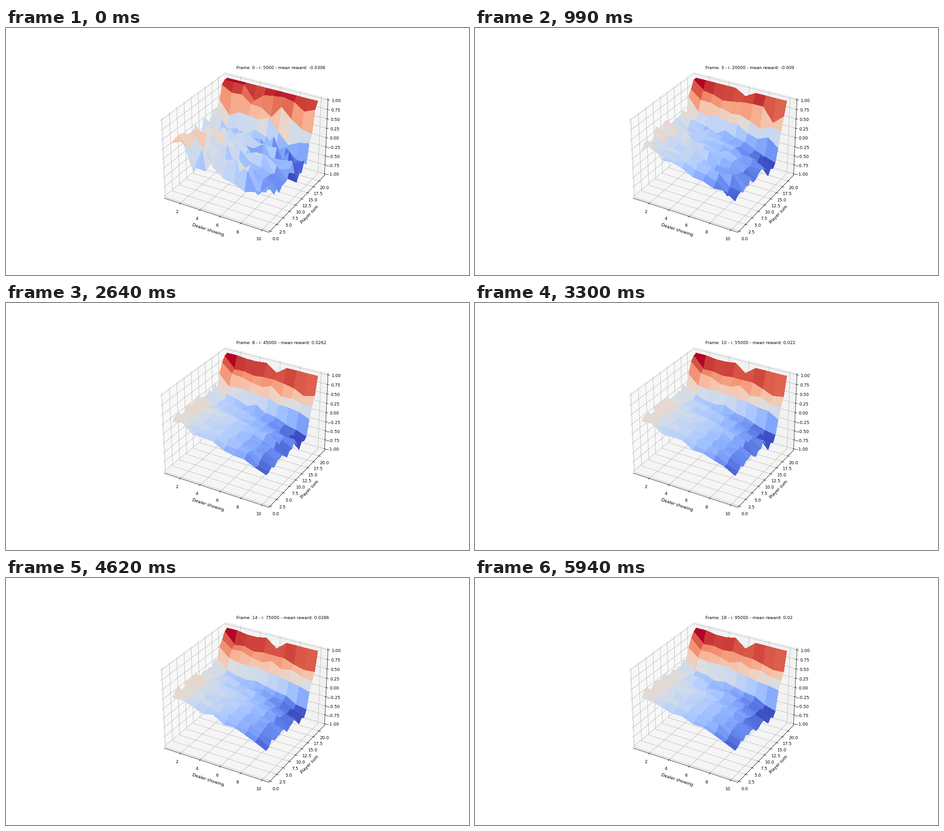
Write a matplotlib script that moves like this. It is 1025 px wide and 547 px high and loops after 6.27 s.

```python
import numpy as np
import matplotlib.pyplot as plt
from matplotlib.animation import FuncAnimation

WIDTH, HEIGHT, DPI = 1025, 547, 68.35
FRAMES, INTERVAL = 19, 330
EPISODES = 5000

rng = np.random.default_rng(21)
dealer, player = np.meshgrid(np.arange(1, 11), np.arange(1, 22))
across = (dealer - 1) / 9
depth = (player - 1) / 15

# How close each player sum is to a sure win
strength = np.interp(player, [16, 17, 18, 19, 20, 21], [0, .08, .42, .57, .70, 1])


def dip(center, width):
    return np.exp(-((dealer - center) / width) ** 2)


def settled_values():
    """Value surface that the estimates approach."""
    low = (.28 - .45 * across - .15 * depth ** 2
           + .05 * np.sin(np.pi * np.minimum(depth, 1)) - .14 * across ** 8)
    ace_bonus = np.where(dealer == 1, .05 + .12 * depth ** 2, 0)
    back_row = np.where(player == 21, .1 * dip(3.5, .8) + .24 * dip(6, .6), 0)
    return low + (1 - low) * strength + ace_bonus - back_row


def running_mean_noise():
    """Monte Carlo error that shrinks as batches are averaged."""
    spread = .2 * (1 - strength ** 4)
    batches = rng.normal(0, 1, (FRAMES, *dealer.shape)) * spread
    return np.cumsum(batches, axis=0) / np.arange(1, FRAMES + 1)[:, None, None]


settled = settled_values()
noise = running_mean_noise()


def values(n):
    early_luck = .35 * strength / (n + 1)
    unlearned = .25 * np.exp(-n / 6) * np.exp(-(player - 18) ** 2)
    return np.clip(settled + noise[n] + early_luck - unlearned, -1, 1)


def mean_reward(n):
    reward = np.interp(n, [0, 3, 5, 8, 10, 14, 18],
                       [-.0306, -.009, .028, .0262, .022, .0286, .02])
    return f"{round(float(reward), 4):g}"


def padded(low, high):
    pad = (high - low) / 48
    return low - pad, high + pad


fig = plt.figure(figsize=(WIDTH / DPI, HEIGHT / DPI), dpi=DPI, facecolor="white")
fig.subplots_adjust(left=.125, right=.9, bottom=.125, top=.88)
ax = fig.add_subplot(projection="3d")
ax.view_init(elev=30, azim=-60)
ax.set_xlim(*padded(.55, 10.45))
ax.set_ylim(*padded(0, 22))
ax.set_zlim(*padded(-1, 1))
ax.set_xticks(np.arange(2, 11, 2))
ax.set_yticks(np.arange(0, 20.1, 2.5))
ax.set_zticks(np.arange(-1, 1.1, .25))
ax.set_xlabel("Dealer showing")
ax.set_ylabel("Player sum")
title = fig.text(510.5 / WIDTH, 1 - 91 / HEIGHT, "", fontsize=9.95)
surfaces = []


def draw(n):
    while surfaces:
        surfaces.pop().remove()
    surfaces.append(ax.plot_surface(dealer, player, values(n), cmap="coolwarm",
                                    linewidth=0, antialiased=False))
    title.set_text(f"Frame: {n} - i: {EPISODES * (n + 1)} - mean reward: {mean_reward(n)}")
    return surfaces + [title]


animation = FuncAnimation(fig, draw, frames=FRAMES, interval=INTERVAL,
                          repeat=True, repeat_delay=0, blit=False)
plt.show()
```
